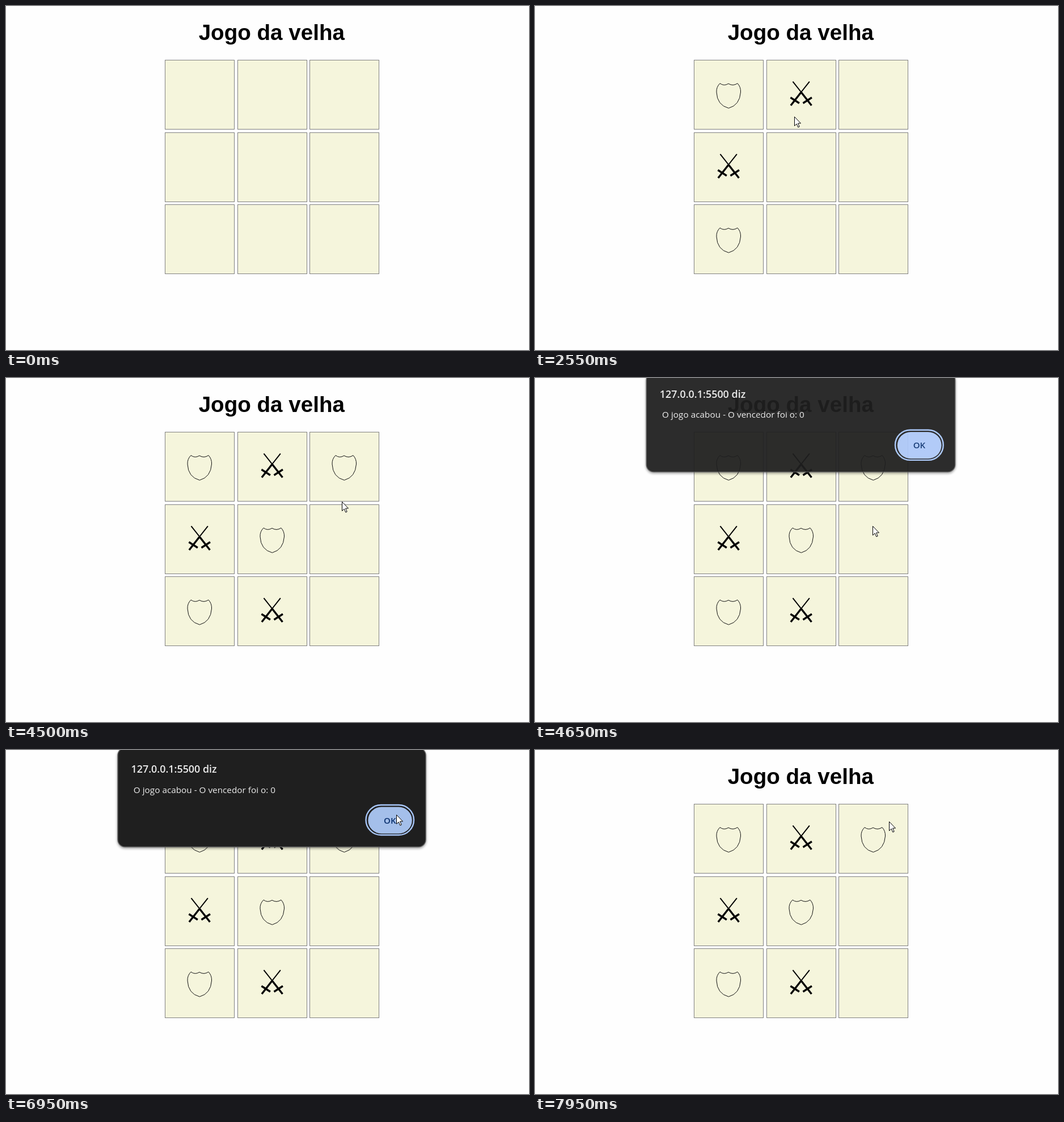
An HTML page that plays this animation: 922x607 px, repeating every 8000 ms.

```html
<!DOCTYPE html>
<html lang="pt-BR">
<head>
<meta charset="utf-8">
<title>Jogo da velha</title>
<style>
  html, body { margin: 0; width: 100%; height: 100%; overflow: hidden; background: #fefefe; }
  svg { display: block; }
  .title { font: bold 38.6px "Liberation Sans", Arial, sans-serif; }
  .cell { fill: #f5f5dc; stroke: #808080; }
  #dialog { font: 15.3px "Open Sans", "Noto Sans", sans-serif; fill: #ececec; }
  #dialog .host { font-size: 17.9px; font-weight: 600; }
  #dialog .ok { font-size: 15px; font-weight: 600; fill: #0b3270; }
  #panel { fill: #1f1f1f; stroke: #606060; stroke-width: 1.4; filter: drop-shadow(0 2px 2px rgba(0, 0, 0, .4)); }
</style>
</head>
<body>
<svg width="922" height="607" viewBox="0 0 922 607">
  <defs>
    <path id="shield" fill="none" stroke="#111"
      d="M46 41.5Q53 47 61 42Q69 47 77 41.5Q83 48 82.5 57Q81 80 61.3 85.3Q41 80 40 57Q39.5 48 46 41.5Z"/>
    <g id="sword" stroke="#000">
      <path stroke-width="2" d="M46.5 38.3L66 63"/>
      <path stroke-width="3.4" d="M61.5 57.5L79.5 80.5M64.5 76.5L80 66.5"/>
    </g>
    <g id="swords">
      <use href="#sword"/>
      <use href="#sword" transform="matrix(-1 0 0 1 122.4 0)"/>
    </g>
  </defs>

  <text class="title" x="468.3" y="60" text-anchor="middle">Jogo da velha</text>
  <g id="board"></g>

  <g id="dialog">
    <rect id="panel" x="197" y="-3.5" width="543" height="174.5" rx="13"/>
    <text class="host" x="220.5" y="40">127.0.0.1:5500 diz</text>
    <text x="224.8" y="75.5">O jogo acabou - O vencedor foi o: 0</text>
    <rect x="634.5" y="97" width="84.5" height="53" rx="26.5" fill="none" stroke="#a8c7fa" stroke-width="2.4"/>
    <rect id="button" x="638.3" y="100.5" width="77.5" height="47" rx="23.5"/>
    <text class="ok" x="676.8" y="129.5" text-anchor="middle">OK</text>
  </g>

  <path id="cursor" fill="#fff" stroke="#000" stroke-linejoin="round"
    d="M.5 .5V16.5L4.2 13L6.8 19L9.2 18L6.6 12H11.5Z"/>
</svg>

<script>
const LOOP = 8000, STEP = 50;
const FIRST_MOVE = 600, MOVE_EVERY = 640;
const order = [0, 3, 6, 1, 4, 7, 2];

// Places the pointer glides between: [time, x, y]
const stops = [
  [50, 87, 2], [600, 380, 172], [850, 362, 237], [1400, 372, 312], [1950, 372, 386],
  [2400, 455, 175], [2900, 465, 266], [3750, 495, 379], [4400, 590, 195], [4650, 595, 261],
  [5750, 612, 232], [6100, 629, 161], [6800, 688, 114], [7600, 686, 117], [7950, 624, 126]
];

const byId = id => document.getElementById(id);
const clamp = v => Math.min(1, Math.max(0, v));
const smooth = p => p * p * (3 - 2 * p);
const show = (el, on) => el.setAttribute('visibility', on ? 'visible' : 'hidden');

// Cells sit on a 127.5 px pitch, snapped to whole pixels
const snap = (start, n) => Math.round(start + n * 127.5);
const place = cell => `translate(${snap(280, cell % 3)} ${snap(95, Math.floor(cell / 3))})`;

byId('board').innerHTML =
  Array.from({length: 9}, (_, cell) =>
    `<rect class="cell" x=".5" y=".5" width="122" height="122" transform="${place(cell)}"/>`).join('') +
  order.map((cell, i) =>
    `<use class="mark" href="#${i % 2 ? 'swords' : 'shield'}" transform="${place(cell)}"/>`).join('');
const marks = document.querySelectorAll('.mark');

function pointerAt(t) {
  const next = Math.max(1, stops.findIndex(stop => stop[0] >= t));
  const [t0, x0, y0] = stops[next - 1], [t1, x1, y1] = stops[next];
  const p = smooth(clamp((t - t0) / (t1 - t0)));
  return [Math.round(x0 + (x1 - x0) * p), Math.round(y0 + (y1 - y0) * p)];
}

function draw(t) {
  marks.forEach((mark, i) => show(mark, t >= FIRST_MOVE + i * MOVE_EVERY));

  const [x, y] = pointerAt(t);
  byId('cursor').setAttribute('transform', `translate(${x} ${y})`);
  show(byId('cursor'), t >= stops[0][0]);

  // The dialog drops in while fading, and leaves the same way
  const open = Math.min(clamp((t - 4500) / 250), clamp((7850 - t) / 250));
  const away = 1 - open, scale = 1 + .0075 * away;
  byId('dialog').setAttribute('opacity', 1 - away ** 3);
  byId('dialog').setAttribute('transform',
    `translate(${468.5 * (1 - scale)} ${-14 * away}) scale(${scale})`);
  show(byId('dialog'), open > 0);

  const hover = x > 638 && x < 716 && y > 100 && y < 147;
  byId('button').setAttribute('fill', hover ? '#a4bfea' : '#adc8f8');
}

function frame() {
  draw(Math.floor(performance.now() % LOOP / STEP) * STEP);
  requestAnimationFrame(frame);
}
frame();
</script>
</body>
</html>
```
